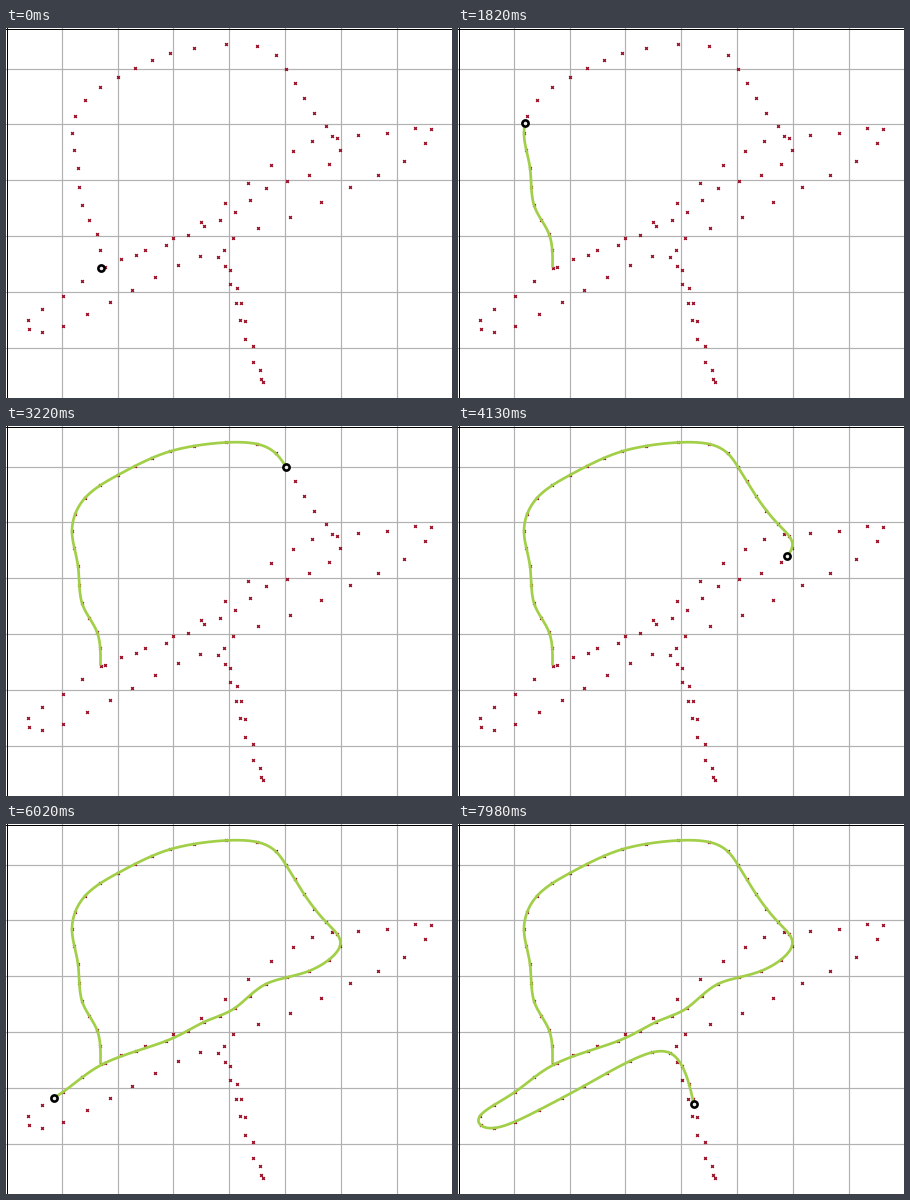
A matplotlib script for the animation above (8000 ms loop, 446 by 370 pixels).

```python
import numpy as np
import matplotlib.pyplot as plt
from matplotlib.animation import FuncAnimation

W, H, DPI = 446, 370, 100
PX = 72 / DPI
LOOP, TICK = 8000, 10
HOLD, STEP = 840, 70
CELL = 55.8

# Bends of the closed tour, two waypoints apart
KEYS = [
    (94.5, 239.5), (91, 206), (76, 177), (72, 140), (66, 105), (79, 72),
    (112, 49), (146, 32), (188, 20), (251, 18), (280, 41), (298, 70),
    (320, 98), (334, 122), (303, 147), (260, 160), (229, 184), (198, 198),
    (160, 217), (99, 239), (57, 268), (22, 292), (36, 304), (81, 286),
    (126, 262), (172, 237), (212, 229), (231, 260), (239, 293), (254, 342),
    (255, 351), (239, 311), (230, 275), (219, 238), (227, 210), (284, 189),
    (344, 159), (398, 133), (425, 101), (381, 105), (326, 108), (287, 123),
    (242, 155), (195, 194), (139, 222)]


def natural_spline(pts):
    """Return a function giving points of the natural cubic spline."""
    n = len(pts)
    system = 4 * np.eye(n) + np.eye(n, k=1) + np.eye(n, k=-1)
    system[0, 0] = system[-1, -1] = 2
    ends = np.pad(pts, ((1, 1), (0, 0)), mode="edge")
    slope = np.linalg.solve(system, 3 * (ends[2:] - ends[:-2]))

    def at(u):
        u = np.asarray(u, float)
        i = np.clip(u.astype(int), 0, n - 2)
        t = (u - i)[:, None]
        blend = t * t * (3 - 2 * t)
        bow = t * (1 - t) * ((1 - t) * slope[i] - t * slope[i + 1])
        return pts[i] + (pts[i + 1] - pts[i]) * blend + bow

    return at


spline = natural_spline(np.array(KEYS + KEYS[:1]))


def tour(u):
    """Points at waypoint numbers u."""
    return spline(np.atleast_1d(u) / 2)


def progress(step):
    """Waypoints passed after a number of steps: nearly constant pace."""
    return np.interp(step, [0, 35, 72, 103], [0, 20, 38.85, 55.3])


fig = plt.figure(figsize=(W / DPI, H / DPI), dpi=DPI, facecolor="white")
ax = fig.add_axes([0, 0, 1, 1])
ax.set_xlim(0, W)
ax.set_ylim(H, 0)
ax.axis("off")

grid = dict(color="#b2b2b2", lw=1.2 * PX, zorder=1)
edge = dict(color="black", lw=PX, zorder=2)
for i in range(1, 8):
    ax.axvline(CELL * i, **grid)
for i in range(6):
    ax.axhline(40.5 + CELL * i, **grid)
for x in (0.5, W - 0.5):
    ax.axvline(x, **edge)
ax.axhline(0.5, **edge)

waypoints = tour(np.arange(2 * len(KEYS)))
ax.plot(*waypoints.T, "x", color="#9a0c22", ms=2.8 * PX, mew=1.3 * PX,
        zorder=3)
trail, = ax.plot([], [], color="#a2cf48", lw=2.7 * PX, zorder=4,
                 solid_capstyle="butt", solid_joinstyle="round")
car, = ax.plot([], [], "o", ms=6.2 * PX, mew=2.6 * PX, mec="black",
               mfc="#eeeeee", zorder=5)


def draw(frame):
    t = frame * TICK
    step = 0 if t < HOLD else (t - HOLD) // STEP + 1
    u = progress(step)
    path = tour(np.linspace(0, u, 2 + int(12 * u)))
    trail.set_data(*path.T)
    car.set_data(*path[-1:].T)
    return trail, car


anim = FuncAnimation(fig, draw, frames=LOOP // TICK, interval=TICK,
                     repeat=True, repeat_delay=0, blit=False)
plt.show()
```
